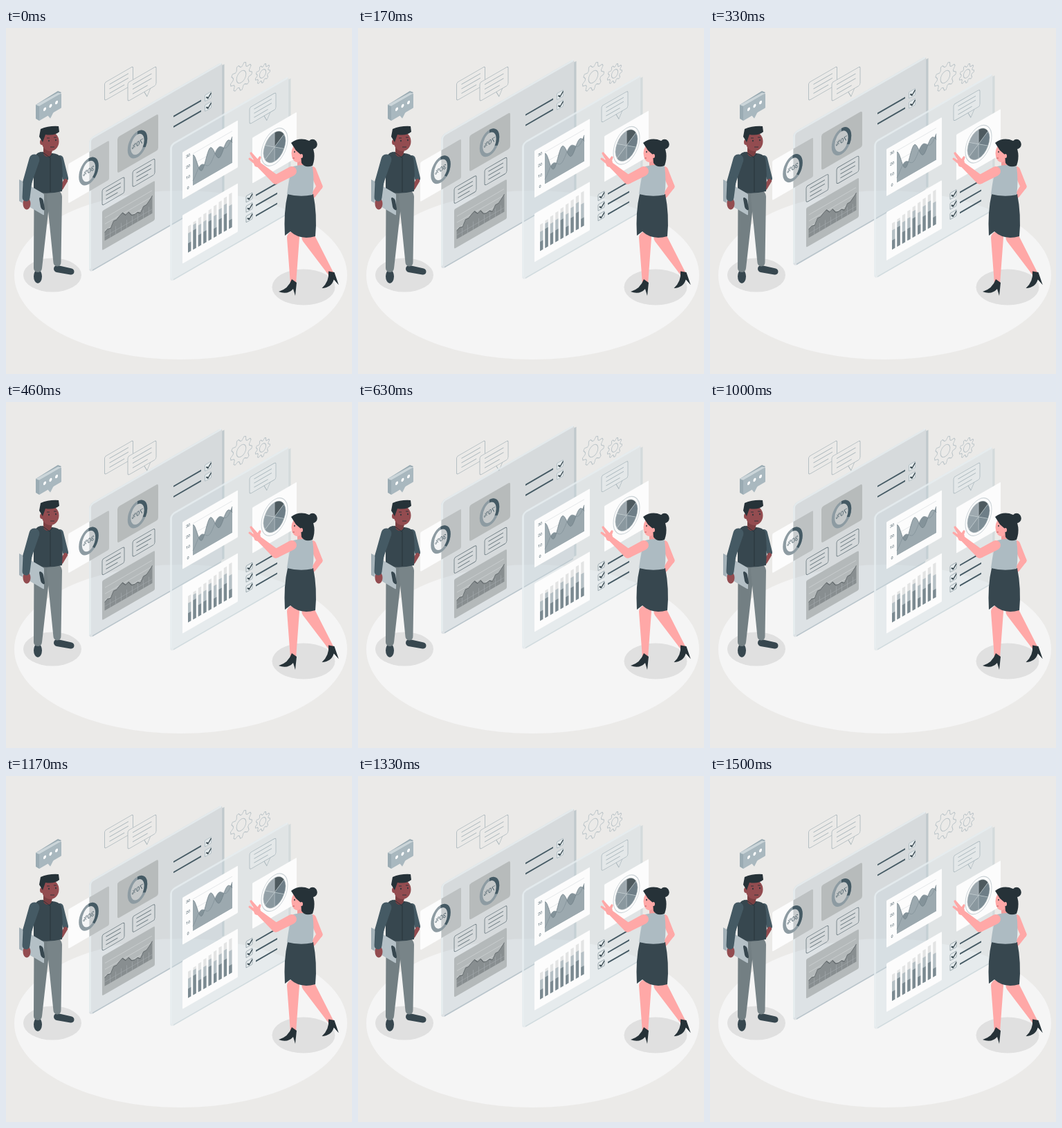
An HTML page with a canvas that plays this animation: 500x500 px, repeating every 1540 ms.

```html
<!DOCTYPE html>
<html lang="en">
<head>
<meta charset="utf-8">
<title>Floating dashboards</title>
<style>
html, body { margin: 0; width: 100%; height: 100%; overflow: hidden; background: #ebeae8; }
canvas { display: block; width: 100vw; height: 100vh; }
</style>
</head>
<body>
<canvas id="stage"></canvas>
<script>
const canvas = document.getElementById('stage');
const ctx = canvas.getContext('2d');
const ratio = window.devicePixelRatio || 1;
canvas.width = canvas.height = 500 * ratio;

const LOOP = 1540, SLOPE = 0.577, TURN = 2 * Math.PI;
const DARK = '#37474f', STEEL = '#455a64', INK = '#263238', PAPER = '#fcfcfc';
const SKIN = '#ffa8a7', BROWN = '#934c50';

function fill(path, color) {
  ctx.fillStyle = color;
  ctx.fill(new Path2D(path));
}

function line(path, color, width = 1) {
  ctx.strokeStyle = color;
  ctx.lineWidth = width;
  ctx.stroke(new Path2D(path));
}

function oval(x, y, rx, ry, color) {
  ctx.beginPath();
  ctx.ellipse(x, y, rx, ry, 0, 0, TURN);
  ctx.fillStyle = color;
  ctx.fill();
}

function ring(rx, ry, color, width, share = 1) {
  ctx.beginPath();
  ctx.ellipse(0, 0, rx, ry, 0, -TURN / 4, (share - 0.25) * TURN);
  ctx.strokeStyle = color;
  ctx.lineWidth = width;
  ctx.stroke();
}

// Tapered limb between two round ends.
function limb(x1, y1, r1, x2, y2, r2, color) {
  const angle = Math.atan2(y2 - y1, x2 - x1);
  ctx.beginPath();
  ctx.arc(x1, y1, r1, angle + TURN / 4, angle - TURN / 4);
  ctx.arc(x2, y2, r2, angle - TURN / 4, angle + TURN / 4);
  ctx.fillStyle = color;
  ctx.fill();
}

function box(w, h, r, color, edge, width = 0.8) {
  ctx.beginPath();
  ctx.roundRect(0, 0, w, h, r);
  if (color) { ctx.fillStyle = color; ctx.fill(); }
  if (edge) { ctx.strokeStyle = edge; ctx.lineWidth = width; ctx.stroke(); }
}

function placed(x, y, draw) {
  ctx.save();
  ctx.translate(x, y);
  draw();
  ctx.restore();
}

// Local axes lie on the upright isometric plane.
function iso(x, y, draw) {
  placed(x, y, () => {
    ctx.transform(1, -SLOPE, 0, 1, 0, 0);
    draw();
  });
}

// Curve of height(u) above a baseline, as path data.
function curve(width, steps, height) {
  let path = '';
  for (let i = 0; i <= steps; i++) {
    path += `${i ? 'L' : 'M'}${width * i / steps} ${-height(i / steps)}`;
  }
  return path;
}

function bubble(x, y, w, h, edge, tail, color) {
  iso(x, y, () => {
    box(w, h, 2.5, color, edge);
    if (tail) line(`M${w * tail} ${h}l4 9 5-9`, edge, 0.8);
    for (let i = 1; i < 4; i++) {
      line(`M${w * 0.17} ${h * i / 4}H${w * (i === 3 ? 0.7 : 0.84)}`, edge);
    }
  });
}

function gear(x, y, r, teeth) {
  iso(x, y, () => {
    ctx.beginPath();
    for (let i = 0; i < teeth * 4; i++) {
      const a = (i + 0.5) * TURN / (teeth * 4);
      const reach = i % 4 < 2 ? r : r * 0.76;
      ctx.lineTo(Math.cos(a) * reach * 0.82, Math.sin(a) * reach);
    }
    ctx.closePath();
    ctx.strokeStyle = '#bcc5c9';
    ctx.lineWidth = 1;
    ctx.stroke();
    ring(r * 0.36, r * 0.44, '#bcc5c9', 1);
  });
}

function check(x, y, edge) {
  iso(x, y, () => {
    box(9, 9, 1, '#e4eaec', edge);
    line('M2 4l2.5 3 4.5-5', DARK, 1.7);
  });
}

function textLine(x, y, w) {
  iso(x, y, () => line(`M0 0H${w}`, STEEL, 2.2));
}

function label(text, x, y, size) {
  ctx.font = `${size}px Roboto, sans-serif`;
  ctx.textAlign = 'center';
  ctx.textBaseline = 'middle';
  ctx.fillStyle = STEEL;
  ctx.fillText(text, x, y);
}

function donut(x, y, text, share) {
  iso(x, y, () => {
    oval(0, 0, 13, 17, 'rgba(225,229,231,.3)');
    ring(12, 16.5, '#8d9ba2', 4.5);
    ring(12, 16.5, STEEL, 4.5, share);
    ctx.scale(-1, 1);
    label(text, 0, 0, 9);
  });
}

function scenery() {
  ctx.fillStyle = '#ebeae8';
  ctx.fillRect(0, 0, 500, 500);
  oval(252.5, 357, 240.5, 122, '#f5f5f5');
  oval(67, 357, 42, 24.5, '#e0e0e0');
  oval(430, 374.5, 45.5, 26, '#e0e0e0');
  bubble(142.5, 79, 41, 26, '#a9b5ba', 0);
  bubble(176, 79, 41, 27, '#a9b5ba', 0.58, '#ebeae8');
  gear(340, 70.5, 19, 9);
  gear(371, 66, 13, 9);
}

function chatIcon() {
  fill('M43 111L75 91 80 93 48 134 43 131Z', '#9aabb3');
  iso(48, 113, () => {
    fill('M-5-5L27-4 32 0H0Z', '#cbd5d9');
    box(32, 21, 1, '#a9b8bf');
    fill('M12 20L16 27 21 20Z', '#a9b8bf');
    for (let i = 0; i < 3; i++) oval(8 + i * 8.5, 9, 2, 2.4, '#fff');
  });
}

function man() {
  limb(78, 189, 5, 86, 217, 4, STEEL);
  limb(86, 221, 3, 80, 231, 3, BROWN);
  oval(46, 359, 6, 10, DARK);
  limb(74, 348, 5, 94, 352, 4.5, DARK);
  limb(52, 244, 11.5, 46, 347, 6, '#737f83');
  limb(70, 244, 11, 74, 339, 5.5, '#788488');
  fill('M50 179Q41 181 40 192V237Q60 241 81 236 83 210 80 188 76 181 66 181Z', DARK);
  limb(61, 172, 7, 60, 180, 6, '#7b3f42');
  oval(64, 164, 12.5, 14, BROWN);
  oval(52, 165, 3, 4, BROWN);
  fill('M53 165L48 157 50 146Q62 141 76 142L77 150Q70 156 57 154Z', INK);
  oval(62, 163, 0.9, 1.3, INK);
  oval(72, 162, 0.9, 1.3, INK);
  line('M59 159h4M69 158h4M64 172h6', INK, 0.9);
  line('M52 179L63 187 68 181M64 187V237', INK, 0.9);
  placed(19, 219, () => {
    ctx.transform(1, SLOPE, 0, 1, 0, 0);
    box(36, 31, 1.5, '#b4c0c6');
    fill('M0 0H4V31H0Z', '#a3b1b8');
    limb(32, 11, 3, 34, 21, 3, DARK);
  });
  oval(30, 254, 5.5, 8.5, BROWN);
  limb(41, 190, 7.5, 31, 222, 6.5, STEEL);
  limb(31, 222, 6.5, 29, 245, 5.5, STEEL);
}

function panel(x, y, w, h, face, side) {
  iso(x, y, () => {
    box(w, h, 6, face);
    line(`M${w + 1} 5V${h - 3}`, side, 3);
    line(`M5 ${h - 1}H${w - 2}`, side, 1.8);
    line(`M1.5 ${h - 5}V6Q2 2 6 1.5H${w - 2}`, 'rgba(232,239,242,.75)', 3);
  });
}

function areaChart() {
  iso(139, 265, () => {
    box(76, 57, 2, '#b4b9ba');
    for (let y = 12; y < 48; y += 9) line(`M4 ${y}H72`, '#cdd1d2', 0.7);
  });
  iso(142.5, 308, () => {
    const top = curve(69, 16, u => 18 - 6 * Math.cos(9 * u) + 2.5 * Math.sin(40 * u));
    fill(top + 'V0H0Z', '#888e90');
    line(top, '#62696c');
    for (let x = 8; x < 68; x += 8) line(`M${x} 0V-12`, '#a2a8aa', 0.6);
    line('M0-6H69', '#a2a8aa', 0.6);
  });
}

function backDashboard(lift) {
  const leftCard = color => iso(90, 197, () => box(59, 57, 2, color));
  placed(0, -lift, () => leftCard(PAPER));
  panel(120, 161 - 2 * lift, 193, 194, 'rgba(170,186,194,.33)', 'rgba(140,161,170,.45)');
  placed(0, -lift, () => {
    ctx.save();
    ctx.beginPath();
    ctx.rect(120.5, 0, 100, 400);
    ctx.clip();
    leftCard('#bdc1c2');
    ctx.restore();
    donut(119.5, 207.5, '30%', 0.4);
    iso(161, 158.5, () => box(59, 52, 3, '#b7bbbb'));
    donut(190, 168.5, '70%', 0.35);
    for (let i = 0; i < 2; i++) {
      textLine(242, 128.5 + i * 15, 40);
      check(287.5, 97.5 + i * 14.5, '#a9b7bd');
      bubble(139 + i * 44, 234 - i * 26.5, 32, 23, '#66757c', 0);
    }
    areaChart();
  });
}

function waveChart() {
  iso(255, 180, () => {
    box(80, 68, 1, PAPER);
    for (let i = 0; i < 4; i++) {
      line(`M15 ${11 + i * 15}H72`, '#dfe3e5', 0.7);
      label([30, 20, 10, 0][i], 8, 10 + i * 15.5, 5.5);
    }
  });
  iso(270, 228, () => {
    const back = curve(57, 40, u => 12 + 24 * u - 6 * Math.cos(14 * u + 0.4));
    const front = curve(57, 40, u => 28 + (16 - 9 * u) * Math.cos(14 * u));
    fill(back + 'V0H0Z', '#84939a');
    fill(front + 'V0H0Z', '#9ca9af');
    line(back, '#84939a', 0.7);
    line(front, '#72828a', 0.7);
  });
}

function barChart() {
  iso(255, 271, () => box(80, 70, 1, PAPER));
  for (let i = 0; i < 9; i++) {
    iso(263 + i * 7.4, 325 - i * 4.27, () => {
      const height = 38 + i * 1.5;
      const dark = 20 + 8 * Math.sin(i * 2.3 - 1);
      const bar = (h, color) => fill(`M0 0H4.3V${-h}H0Z`, color);
      bar(height, '#e3e4e4');
      bar((height + dark) / 2 + 2, '#b5c0c5');
      bar(dark, '#7b8a91');
    });
  }
}

function pieCard() {
  iso(356, 159, () => box(64, 66, 1, PAPER));
  iso(388, 172.5, () => {
    ring(19, 25, '#cbd3d7', 1);
    for (let i = 0; i < 6; i++) {
      ctx.beginPath();
      ctx.moveTo(0, 0);
      ctx.ellipse(0, 0, 16, 21, 0, (i / 6 - 0.25) * TURN, ((i + 1) / 6 - 0.25) * TURN);
      ctx.closePath();
      ctx.fillStyle = `hsl(200, 10%, ${34 + 14 * Math.sqrt(i)}%)`;
      ctx.fill();
      ctx.strokeStyle = '#c7d0d4';
      ctx.lineWidth = 0.4;
      ctx.stroke();
    }
  });
}

function frontDashboard(lift) {
  placed(0, -lift, () => {
    panel(237, 169, 172, 199, 'rgba(204,217,223,.38)', 'rgba(170,188,196,.35)');
    waveChart();
    barChart();
    bubble(352, 115.5, 38, 24, '#aab7bd', 0.55, 'rgba(235,240,242,.3)');
    for (let i = 0; i < 3; i++) {
      check(347, 243.5 + i * 14.5, '#8d9ca3');
      textLine(361, 242.5 + i * 14.7, 31);
    }
    pieCard();
  });
}

function heel(x, y, turn) {
  placed(x, y, () => {
    ctx.rotate(turn);
    fill('M-22 15Q-8 11-3-3L4 2 2 21-1 11Q-9 20-22 15Z', INK);
  });
}

function woman() {
  limb(443, 205, 5, 453, 229, 4.5, SKIN);
  limb(453, 229, 4.5, 444, 242, 3.5, SKIN);
  limb(437, 303, 9.5, 469, 354, 4, SKIN);
  limb(415, 303, 9, 415, 370, 4, SKIN);
  heel(416, 366, 0);
  heel(470, 353, -0.44);
  fill('M407 240H444Q450 270 447 301 425 307 411 294L403 300Q401 265 407 240Z', DARK);
  limb(428, 188, 7, 429, 200, 8, '#f29b9a');
  fill('M415 200Q430 196 443 200 446 222 443 241 425 245 406 240 409 215 415 200Z', '#adbbc2');
  limb(413, 207, 7, 390, 219, 6.5, SKIN);
  limb(390, 219, 6.5, 367, 199, 4, SKIN);
  oval(363, 195, 5, 6, SKIN);
  limb(362, 192, 3, 354, 181, 1.6, SKIN);
  limb(359, 194, 2, 352, 189, 1.5, SKIN);
  limb(365, 191, 2.2, 367, 187, 1.6, SKIN);
  oval(421, 181, 8.5, 13, SKIN);
  oval(417, 179, 0.8, 1.2, INK);
  line('M414 188h3', '#c65d5f');
  oval(443, 168, 6.8, 7.2, INK);
  fill('M412 166Q424 157 438 163 450 180 443 199 432 203 427 195L426 183 419 177Z', INK);
  oval(427, 185, 2, 3, SKIN);
}

function render(time) {
  const phase = ((time + 40) % LOOP) / LOOP;
  const lift = 10 * (1 - Math.abs(2 * phase - 1));
  ctx.setTransform(ratio, 0, 0, ratio, 0, 0);
  ctx.lineJoin = 'round';
  scenery();
  chatIcon();
  man();
  backDashboard(lift);
  frontDashboard(lift);
  woman();
}

const start = performance.now();
function tick() {
  render(performance.now() - start);
  requestAnimationFrame(tick);
}
tick();
</script>
</body>
</html>
```
